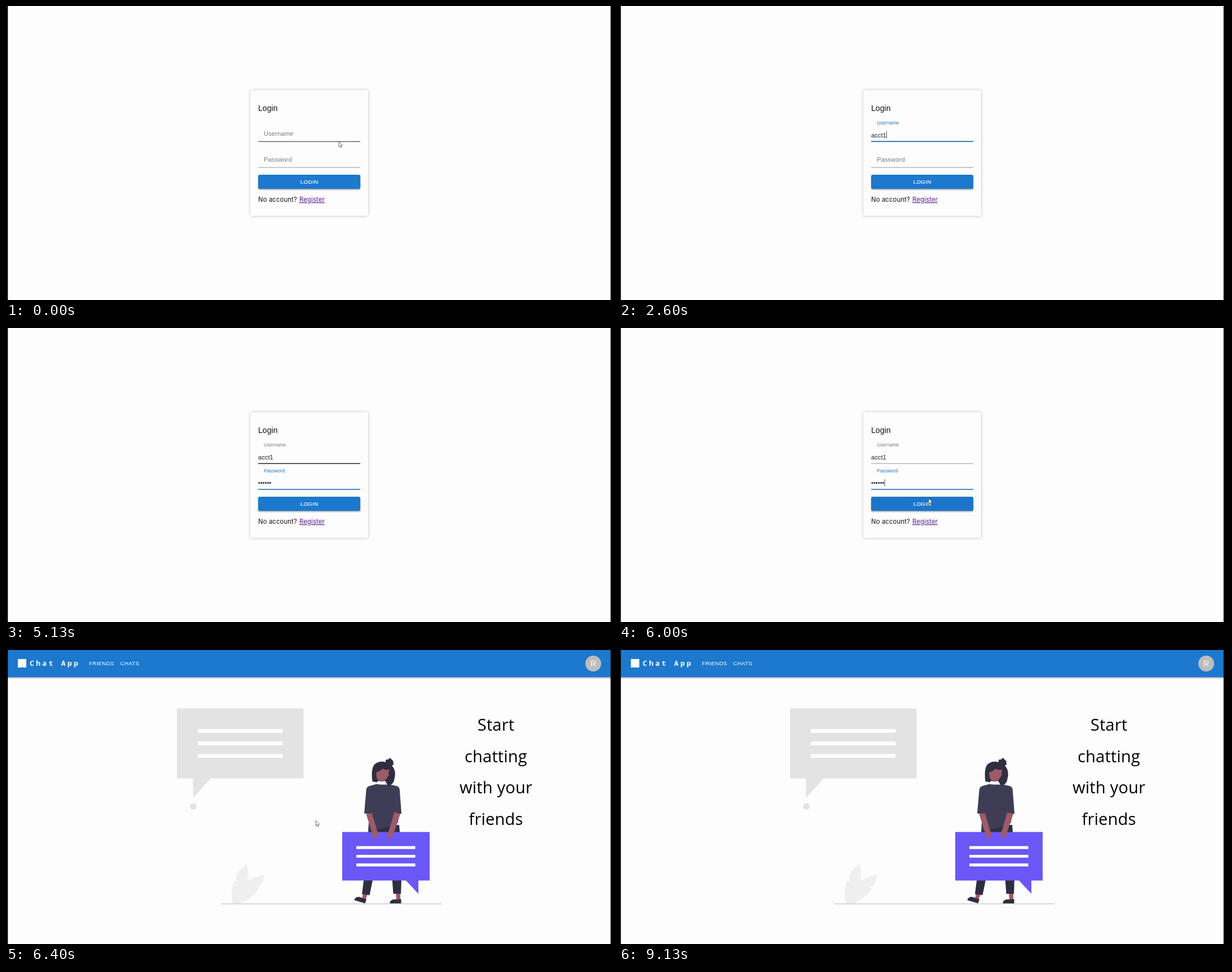
Animation, 1076 px wide and 521 px high, one loop 9200 ms. Source, as an HTML page:

```html
<!DOCTYPE html>
<html lang="en">
<head>
<meta charset="utf-8">
<title>Login and chat demo</title>
<style>
  html, body { margin: 0; width: 100%; height: 100%; overflow: hidden; background: #fdfdfd; }
  svg { display: block; width: 100%; height: 100%; font-family: "Liberation Sans", Arial, sans-serif; }
  text { white-space: pre; }
  .field { font-size: 11.15px; letter-spacing: .1px; }
  .input { font-size: 11.2px; fill: #222; }
  .caps { font-size: 9.75px; letter-spacing: .28px; fill: #fdfdfd; }
  .note { font-family: Inter, sans-serif; font-size: 11.3px; letter-spacing: .14px; }
  .brand { font: 700 13px "Noto Sans Mono", monospace; letter-spacing: 3.36px; fill: #fdfdfd; }
  .slogan { font: 29px "Open Sans", sans-serif; letter-spacing: .2px; text-anchor: middle; }
</style>
</head>
<body>
<svg viewBox="0 0 1076 521" preserveAspectRatio="none">
  <defs>
    <filter id="glow" x="-10%" y="-10%" width="120%" height="120%">
      <feDropShadow dx="0" dy="0" stdDeviation="2.6" flood-opacity=".27"/>
    </filter>
    <filter id="lift" x="-5%" y="-30%" width="110%" height="180%">
      <feDropShadow dx="0" dy="1.5" stdDeviation="1.2" flood-opacity=".4"/>
    </filter>
    <clipPath id="buttonClip"><rect x="447" y="299" width="181" height="25" rx="2.8"/></clipPath>
  </defs>
  <rect width="1076" height="521" fill="#fdfdfd"/>

  <g id="login">
    <rect x="433.5" y="149.3" width="208.5" height="222.7" rx="3" fill="#fdfdfd" filter="url(#glow)"/>
    <text x="447" y="185.7" font-size="13.9" letter-spacing=".1" fill="#111">Login</text>
    <g id="fields"></g>
    <rect id="button" x="447" y="299" width="181" height="25" rx="2.8" filter="url(#lift)"/>
    <g clip-path="url(#buttonClip)"><circle id="ripple" cx="546" cy="304" fill="#fff"/></g>
    <text class="caps" x="537.6" y="314.6" text-anchor="middle" stroke="#fdfdfd" stroke-width=".2">LOGIN</text>
    <text class="note" x="447" y="347" fill="#111">No account?</text>
    <text class="note" x="520" y="347" fill="#551a8b" text-decoration="underline">Register</text>
  </g>

  <g id="home">
    <rect x="-10" y="-6" width="1096" height="54" fill="#1f79ce" filter="url(#lift)"/>
    <rect x="21" y="16" width="15" height="15" fill="#fdfdfd"/>
    <text class="brand" x="42" y="28.2">Chat App</text>
    <text class="caps" x="147" y="27.2">FRIENDS</text>
    <text class="caps" x="202.6" y="27.2">CHATS</text>
    <circle cx="1041" cy="24" r="14" fill="#bdbdbd"/>
    <text x="1041" y="28.7" font-size="14" fill="#fdfdfd" text-anchor="middle">R</text>

    <path fill="#e3e3e3" d="M303 103.5H527.5V227.5H363L331.5 262V227.5H303Z"/>
    <circle cx="332" cy="277.2" r="5.9" fill="#e3e3e3"/>
    <path stroke="#fdfdfd" stroke-width="6.8" d="M340 143.3H490.5M340 165.5H490.5M340 187.7H490.5"/>

    <path fill="#efefef" d="M402 449C398 435 400 417 405 409L410 411L407 403C412 392 419 383 427 379
      C428.500 387 430 394 429.500 401L424 407L430 405.500L430 409C438 403 448 400 458 398
      C457 407 454 413 450 419L444 419L447.500 423C440 436 428 444 416 449Z"/>
    <path stroke="#c6c6c6" stroke-width="1.2" d="M381 449.800H772"/>

    <!-- legs and shoes -->
    <path fill="#9d5a69" d="M633 430L641 432L637 444L631 442ZM691 430H699V444H692Z"/>
    <path fill="#2f2e41" d="M634.500 405H650.500L644.500 434.500L631 432.500ZM684.500 405H701L700 432H686.500Z
      M617.500 442C620 437 626 436.500 629 438.500L639 442L636.500 449L618 443.500Z
      M680.500 449C680 444 685 441.500 690 442L700.500 441.500V449Z"/>
    <!-- torso -->
    <path fill="#2f2e41" d="M642 323L644 310H697L698 323Z"/>
    <path fill="#3f3d56" d="M657 237.500C664 239.500 675 238 682 238.500L694 241.500C697 243 698 246 698 250
      L701 290L696 291L695 306C680 315 662 317 642 320.500L644 291L635 289.500L638.500 249
      C639 244 641 242 644 241Z"/>
    <!-- head -->
    <path fill="#2f2e41" d="M649.500 233C648 221 648 209 653 203C658 198 667 196.500 673 199
      C672 194.500 675 192.500 678.500 194.500C677.500 191 681 190.500 683 193.500L687 197.500L686 200L688 202L684 205
      C690 211 691 220 688.500 228C688 235 684 239.500 677 240L672 232L658 234.500Z"/>
    <path fill="#9d5a69" d="M655 214C660 215 664 213 668 210C670 212 674 213 680 212C679 216 677 217 679 221
      C675 226 675 231 667 232.500C659 232.500 653.500 226 655 214Z"/>
    <path fill="#2f2e41" d="M653 212L661 207L670 208L664 213.500L656 217L658 231L651 231Z"/>
    <path fill="#fdfdfd" d="M658.500 232L666 233L672 233L675 238H658Z"/>
    <!-- held bubble, arms -->
    <path fill="#6a57f6" d="M596 322.500H751V408.500H731V432L709 408.500H596Z"/>
    <path stroke="#fdfdfd" stroke-width="5.200" d="M621 350.200H725.500M621 365.500H725.500M621 380.800H725.500"/>
    <path fill="#9d5a69" d="M638.500 291L648.500 289L658.500 322C662 329 658 334.500 653.500 333.500
      C649 333 648 328 649 324ZM688.500 287.500L699 290.500L687 326C687 332 682 334.500 678.500 332.500
      C675 330 676 325 678.500 321Z"/>
    <g class="slogan">
      <text x="868.500" y="143">Start</text>
      <text x="868.500" y="198.500">chatting</text>
      <text x="868.500" y="254">with your</text>
      <text x="868.500" y="309.500">friends</text>
    </g>
  </g>

  <path id="pointer" d="M0 0V9.600L2.200 7.500L3.700 10.900L5.200 10.200L3.700 7H6.500Z" fill="#fdfdfd" stroke="#333" stroke-width=".7"/>
  <path d="M0 0H3.300V521H0ZM1071.700 0H1076V521H1071.700Z"/>
</svg>

<script>
const LOOP = 9200;
const FOCUS_USER = 400, FOCUS_PASS = 2800, PRESS = 6080, ENTER = 6400;
const BLINK = 530;
const BLUE = '#1f79ce';
const $ = id => document.getElementById(id);

const clamp = x => Math.max(0, Math.min(1, x));
const span = (t, start, length) => clamp((t - start) / length);
const mix = (a, b, k) => a + (b - a) * k;
const smooth = x => x * x * (3 - 2 * x);
const show = (el, on) => el.setAttribute('visibility', on ? 'visible' : 'hidden');

function set(el, attrs) {
  for (const name in attrs) el.setAttribute(name, attrs[name]);
}

function bezier(x1, y1, x2, y2) {
  const at = (a, b, s) => 3 * a * s * (1 - s) ** 2 + 3 * b * s * s * (1 - s) + s ** 3;
  return x => {
    let lo = 0, hi = 1;
    for (let i = 0; i < 20; i++) {
      const mid = (lo + hi) / 2;
      if (at(x1, x2, mid) < x) lo = mid; else hi = mid;
    }
    return at(y1, y2, lo);
  };
}
const easeOut = bezier(0, 0, .2, 1);
const easeInOut = bezier(.4, 0, .2, 1);

// Each field: its underline height, focus interval, typed text and key times.
const fields = [
  { label: 'Username', y: 240.2, focus: FOCUS_USER, blur: FOCUS_PASS,
    value: 'acct1', keys: [800, 1200, 1530, 1860, 2330] },
  { label: 'Password', y: 286.1, focus: FOCUS_PASS, blur: PRESS,
    value: '••••••', keys: [3260, 3530, 3730, 4060, 4330, 4600] }
];

function add(parent, tag, attrs) {
  const el = document.createElementNS('http://www.w3.org/2000/svg', tag);
  set(el, attrs);
  return parent.appendChild(el);
}

for (const f of fields) {
  const g = $('fields');
  f.rule = add(g, 'path', { d: `M447 ${f.y}H628` });
  f.accent = add(g, 'path', { stroke: BLUE, 'stroke-width': 1.5 });
  f.tag = add(g, 'text', { class: 'field' });
  f.tag.textContent = f.label;
  f.input = add(g, 'text', { class: 'input', x: 447, y: f.y - 7.7 });
  f.caret = add(g, 'path', { stroke: '#222', 'stroke-width': .8 });
}

// Pointer stops: time, x, y; motion eases between neighbours.
const stops = [
  [60, 590, 240], [350, 583, 229], [5600, 583, 229], [6000, 549, 302],
  [6560, 549, 302], [7400, 970.5, 0], [7500, 970.5, 0], [7680, 974, -14]
];

function pointerAt(t) {
  if (t <= stops[0][0]) return stops[0].slice(1);
  for (let i = 1; i < stops.length; i++) {
    const [t0, x0, y0] = stops[i - 1], [t1, x1, y1] = stops[i];
    if (t < t1) {
      const k = smooth(span(t, t0, t1 - t0));
      return [mix(x0, x1, k), mix(y0, y1, k)];
    }
  }
  return stops[stops.length - 1].slice(1);
}

function drawField(f, t, py) {
  const active = t >= f.focus && t < f.blur;
  const raise = easeOut(span(t, f.focus, 200));
  const hover = py > f.y - 32 && py < f.y + 1;
  const thick = hover && t > f.focus;
  set(f.rule, { stroke: hover ? '#2b2426' : '#979797', 'stroke-width': thick ? 1.5 : 1 });

  const half = 90.5 * (raise - easeOut(span(t, f.blur, 200)));
  f.accent.setAttribute('d', `M${537.5 - half} ${f.y}H${537.5 + half}`);
  show(f.accent, half > .1);

  set(f.tag, {
    fill: active ? BLUE : '#7b7b7b',
    transform: `translate(457 ${f.y - mix(9.9, 29.9, raise)}) scale(${mix(1, .75, raise)})`
  });

  const typed = f.keys.filter(k => k <= t).length;
  const text = f.value.slice(0, typed);
  if (f.input.textContent !== text) f.input.textContent = text;
  const since = t - (typed ? f.keys[typed - 1] : f.focus);
  const x = 447.5 + (typed ? f.input.getComputedTextLength() : 0);
  f.caret.setAttribute('d', `M${x} ${f.y - 18}V${f.y - 5.5}`);
  show(f.caret, active && Math.floor(since / BLINK) % 2 === 0);
}

function draw(t) {
  const [px, py] = pointerAt(t);
  const home = t >= ENTER;
  $('login').style.display = home ? 'none' : '';
  $('home').style.display = home ? '' : 'none';

  if (!home) {
    for (const f of fields) drawField(f, t, py);
    const over = span(t, 5940, 250);
    const shade = [[31, 24], [121, 99], [206, 184]].map(([a, b]) => Math.round(mix(a, b, over)));
    $('button').setAttribute('fill', `rgb(${shade})`);
    const grow = easeInOut(span(t, PRESS, 550));
    set($('ripple'), { r: 101 * grow, opacity: .1 + .07 * grow });
  }

  $('pointer').setAttribute('transform', `translate(${px} ${py})`);
  show($('pointer'), t < fields[0].keys[0] || (t >= 5600 && t < 7680));
}

const begin = performance.now();
function tick() {
  draw((performance.now() - begin) % LOOP);
  requestAnimationFrame(tick);
}
tick();
</script>
</body>
</html>
```
